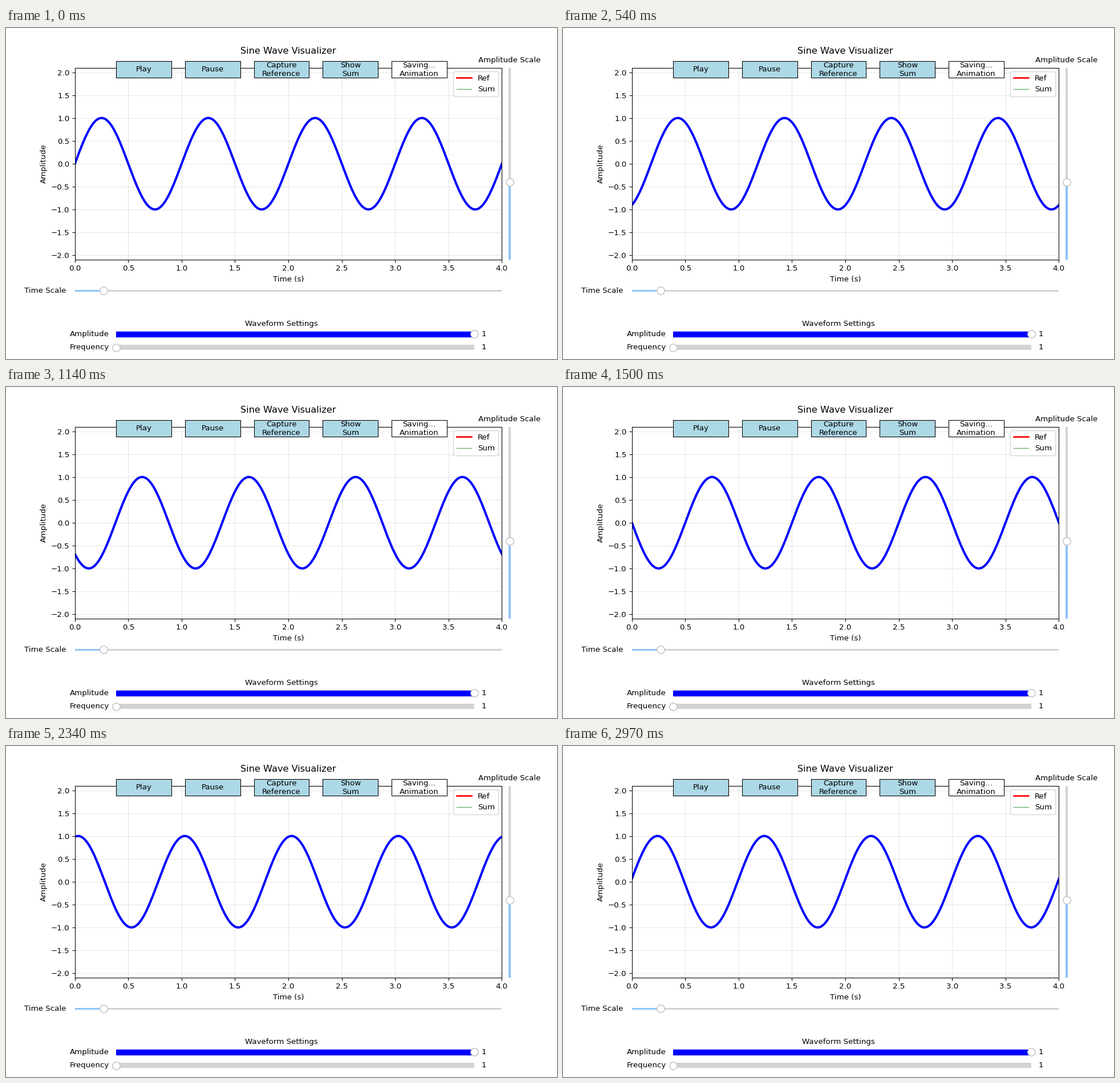
A matplotlib script for the animation above (3000 ms loop, 966x580 px).

```python
import numpy as np
import matplotlib.pyplot as plt
from matplotlib.animation import FuncAnimation
from matplotlib.widgets import Button, Slider

FRAMES, INTERVAL = 100, 30
SKY = "#8fc4fa"

plt.rcParams.update({"font.family": "DejaVu Sans", "font.size": 10, "toolbar": "None"})

# 966 x 580 pixels, with a hair of margin against rounding down
fig = plt.figure(figsize=(10.0001, 6.0042), dpi=96.6, facecolor="white")
ax = fig.add_axes([0.125, 0.3, 0.775, 0.58])

t = np.linspace(0, 4, 1000)
wave, = ax.plot(t, np.sin(2 * np.pi * t), color="blue", lw=3)
ax.plot([], [], color="red", lw=2, label="Ref")
ax.plot([], [], color="green", lw=1, alpha=0.6, label="Sum")

ax.set(xlim=(0, 4), ylim=(-2.1, 2.1), xlabel="Time (s)", ylabel="Amplitude")
ax.set_title("Sine Wave Visualizer", pad=18.5)
ax.grid(alpha=0.3)
ax.legend(loc="upper right")


def add_button(i, label, color="lightblue"):
    return Button(fig.add_axes([0.2 + 0.125 * i, 0.85, 0.1, 0.05]), label, color=color)


def add_slider(rect, label, value, text="", orientation="horizontal", **style):
    slider = Slider(fig.add_axes(rect), label, 0, 1, valinit=value,
                    orientation=orientation, **style)
    slider.valtext.set_text(text)
    return slider


buttons = [add_button(i, label) for i, label in
           enumerate(["Play", "Pause", "Capture\nReference", "Show\nSum"])]
buttons.append(add_button(4, "Saving...\nAnimation", "white"))

thin = dict(color=SKY, linewidth=0)
sliders = [
    add_slider([0.125, 0.2, 0.775, 0.0125], "Time Scale", 0.0671, **thin),
    add_slider([0.91, 0.3, 0.0075, 0.58], "Amplitude Scale", 0.404,
               orientation="vertical", **thin),
    add_slider([0.2, 0.06, 0.65, 0.03], "Amplitude", 1, "1", color="blue"),
    add_slider([0.2, 0.02, 0.65, 0.03], "Frequency", 0, "1", color="blue"),
]
fig.text(0.5, 0.1, "Waveform Settings", ha="center")


def update(i):
    wave.set_ydata(np.sin(2 * np.pi * (t - i / FRAMES)))
    return wave,


anim = FuncAnimation(fig, update, frames=FRAMES, interval=INTERVAL,
                     repeat=True, repeat_delay=0)
plt.show()
```
